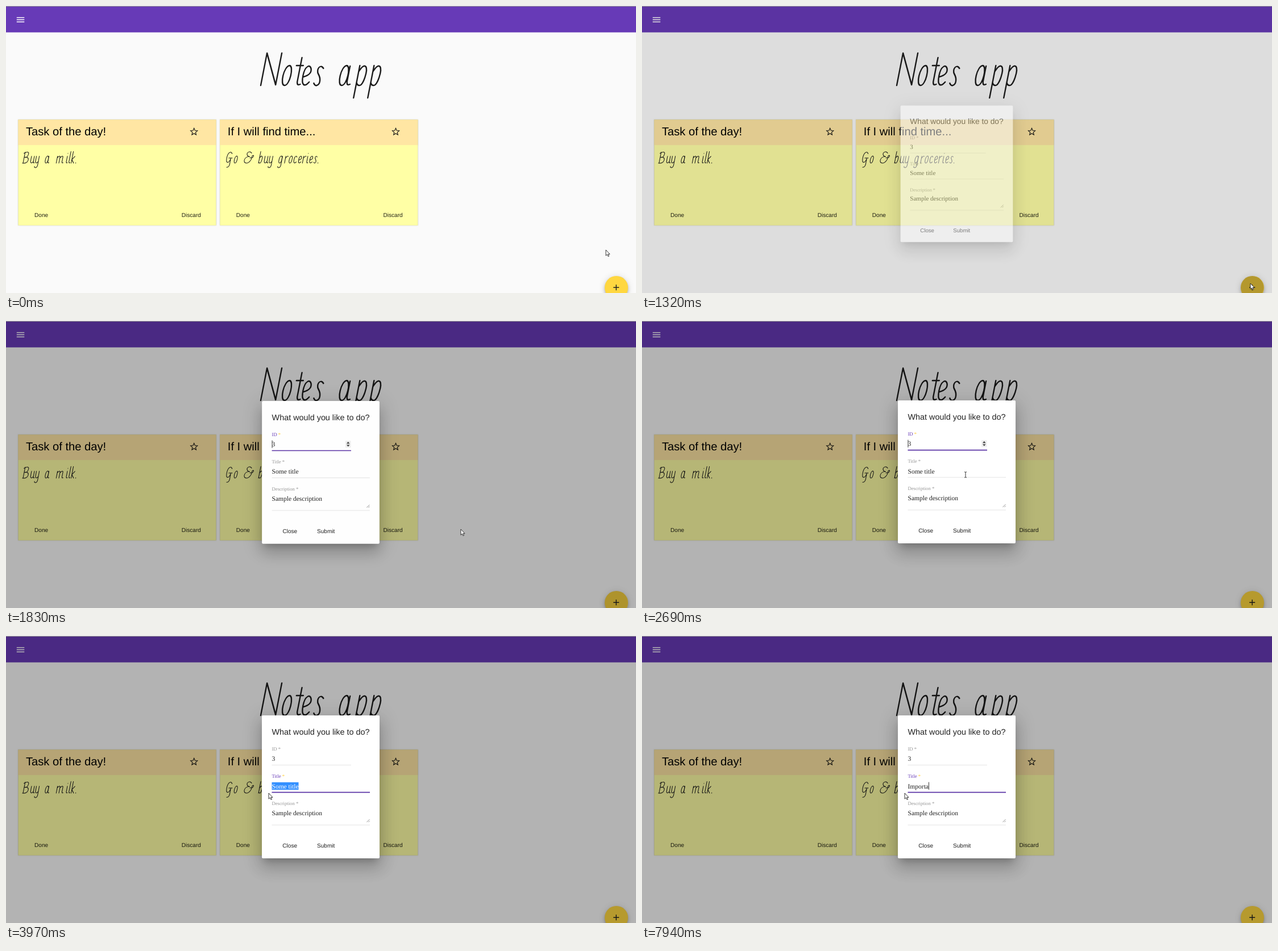
These frames come from a looping animation (1108 px wide and 506 px high, 8000 ms). An HTML page:

```html
<!DOCTYPE html>
<html lang="en">
<head>
<meta charset="utf-8">
<title>Notes app</title>
<style>
  html, body { margin: 0; width: 100%; height: 100%; overflow: hidden; background: #fafafa; }
  #stage { position: relative; width: 1108px; height: 506px; overflow: hidden; background: #fafafa; }
  #stage > * { position: absolute; }
  svg { display: block; overflow: visible; }
  text { font-family: "Liberation Sans", Arial, sans-serif; white-space: pre; fill: rgba(0,0,0,.87);
    text-rendering: geometricPrecision; }
  .serif { font-family: "Liberation Serif", "Times New Roman", serif; }
  .label { fill: rgba(0,0,0,.42); }
  .label.on { fill: #673ab7; }
  .label.on tspan { fill: #ffc928; }
  .hand { fill: none; stroke: #1b1b1b; stroke-linecap: round; stroke-linejoin: round; }
  .card { filter: drop-shadow(0 .9px .6px rgba(0,0,0,.26)) drop-shadow(0 .5px 1px rgba(0,0,0,.14)); }
  #fab { left: 1053px; top: 476px; width: 40.5px; height: 40.5px; border-radius: 50%; background: #ffd740;
    box-shadow: 0 2px 3.6px -.7px rgba(0,0,0,.2), 0 4.3px 7.2px rgba(0,0,0,.14), 0 .7px 13px rgba(0,0,0,.12); }
  #shade { inset: 1px 0 0 0; background: #000; }
  #edge { top: 0; width: 100%; height: 1px; background: #999; }
  #dialog { left: 450px; top: 139.8px; width: 207px; height: 252px; border-radius: 2px; background: #fff;
    box-shadow: 0 8px 11px -5px rgba(0,0,0,.2), 0 17px 27px 2px rgba(0,0,0,.14), 0 6.5px 33px 6px rgba(0,0,0,.12); }
</style>
</head>
<body>
<div id="stage">
  <div id="fab"></div>
  <svg id="scene" width="1108" height="506"></svg>
  <div id="shade"></div>
  <div id="dialog"><svg id="form" width="207" height="252" viewBox="450 139.8 207 252"></svg></div>
  <div id="edge"></div>
  <svg id="pointer" width="1108" height="506">
    <path id="arrow" d="M0 0V10.2L2.4 8L4 11.6L5.6 10.9L4.1 7.5H7Z" fill="#fff" stroke="#222" stroke-width=".9"/>
    <path id="beam" d="M-2 -5Q0 -5 0 -4Q0 -5 2 -5M0 -4V4M-2 5Q0 5 0 4Q0 5 2 5" fill="none" stroke="#333"/>
  </svg>
</div>
<script>
const LOOP = 8000;
const $ = id => document.getElementById(id);

// Stroke lettering: [path, advance], upright, baseline 0, slanted when drawn.
const bowl = 'M8 -35C-2 -34 -3 0 6 0S16 -34 8 -35';
const lobe = 'M0 -24Q6 -38 11 -33C16 -27 13 0 6 0Q2 0 0 -5';
const hook = 'q1 7 6 4';
const loop = 'M14 -34V10q-1 12 -8 12t-6 -6';
const cup = 'M0 -34V-11C1 3 12 2 14 -11';
const curl = 'C9 -38 0 -35 0 -17S7 3 13 -6';
const small = {
  a: [bowl + 'M14 -34V-6' + hook, 31],
  b: ['M0 -57V0' + lobe, 26],
  c: ['M12 -29' + curl, 23],
  e: ['M1 -15Q15 -19 12 -29' + curl, 21.5],
  g: [bowl + loop, 30],
  i: ['M0 -34V-6' + hook + 'M0 -48v1', 13],
  k: ['M0 -57V0M12 -33L0 -17L12 0', 20],
  l: ['M0 -57V-6' + hook, 12],
  m: ['M0 -34V0M0 -25Q8 -39 13 -31V0M13 -25Q22 -39 27 -31V-6' + hook, 48],
  o: [bowl, 23],
  p: ['M0 22V-35' + lobe, 25],
  r: ['M0 -34V0M0 -23Q6 -37 12 -33', 20],
  s: ['M12 -30C5 -39 -1 -28 5 -20S12 -2 6 0Q3 1 0 -4', 19],
  t: ['M4 -49V-6' + hook + 'M-3 -35H9', 12],
  u: [cup + 'M14 -34V-6' + hook, 24],
  y: [cup + loop, 22]
};
const others = {
  N: ['M0 0V-57L26 -1V-57', 36],
  B: ['M0 0V-54M-5 -48Q20 -62 18 -43T0 -29Q24 -31 22 -14T-3 0', 35],
  G: ['M22 -46C14 -62 0 -52 0 -25S14 4 20 -21M10 -25H27M20 -25V8Q18 22 8 20', 39],
  '&': ['M30 -49C18 -62 4 -52 10 -40Q14 -32 24 -32C-4 -34 -6 0 14 0C28 0 36 -18 35 -30C35 -42 46 -39 41 -30Q37 -24 26 -26', 48],
  '.': ['M2 -2v2', 8],
  ' ': ['', 25]
};
const glyphs = { ...small, ...others };

function hand(x, y, scale, width, str) {
  let pen = 0;
  const marks = [...str].map(ch => {
    const [d, advance] = glyphs[ch];
    const mark = `<path d="${d}" transform="translate(${pen})"/>`;
    pen += advance;
    return mark;
  }).join('');
  return `<g class="hand" role="img" aria-label="${str.replace('&', '&amp;')}" stroke-width="${width / scale}"
    transform="translate(${x} ${y}) scale(${scale}) skewX(-11)">${marks}</g>`;
}

const text = (x, y, size, str, attrs = '') =>
  `<text x="${x}" y="${y}" font-size="${size}" ${attrs}>${str}</text>`;
const line = (d, color, width, attrs = '') =>
  `<path d="${d}" stroke="${color}" stroke-width="${width}" fill="none" ${attrs}/>`;
const rect = (x, y, w, h, fill) =>
  `<rect x="${x}" y="${y}" width="${w}" height="${h}" fill="${fill}"/>`;

function star(cx, cy) {
  const points = Array.from({ length: 10 }, (_, i) => {
    const r = i % 2 ? 2.9 : 6.4, a = (i / 5 - .5) * Math.PI;
    return `${cx + r * Math.cos(a)},${cy + r * Math.sin(a)}`;
  }).join(' ');
  return `<polygon points="${points}" fill="none" stroke="#111" stroke-width="1.1"/>`;
}

const card = (x, title, body, bodyX) =>
  `<g class="card">${rect(x, 200.5, 348, 186.3, '#ffffa5')}${rect(x, 200.5, 348, 44.7, '#ffe6a3')}</g>` +
  text(x + 13.5, 227.6, 20.16, title, 'style="fill:#000"') + star(x + 309.2, 221.8) +
  hand(bodyX, 277, .36, 1.05, body) +
  text(x + 28.5, 371.6, 10.08, 'Done') + text(x + 287.2, 371.6, 10.08, 'Discard');

$('scene').innerHTML =
  '<clipPath id="round"><circle cx="1073.25" cy="496.25" r="20.25"/></clipPath>' +
  rect(0, 1, 1108, 45.5, '#673ab7') +
  line('M18.8 20.4H32.3M18.8 24.2H32.3M18.8 28H32.3', '#fff', 1.5) +
  hand(448, 140, 1, 2.4, 'Notes app') +
  card(21.5, 'Task of the day!', 'Buy a milk.', 30) +
  card(376.3, 'If I will find time...', 'Go & buy groceries.', 386.5) +
  '<circle id="ripple" cx="1069" cy="489" clip-path="url(#round)"/>' +
  line('M1068.2 496.2H1078.2M1073.2 491.2V501.2', '#222', 1.45);

const X = 467.5;
const label = (y, str, id = '') =>
  text(X, y, 8.64, `${str} <tspan>*</tspan>`, `class="serif label" id="${id}"`);
const rule = (y, right) => line(`M${X} ${y}H${right}`, '#ddd', .8);
const focusRule = (y, right, id) => line(`M${X} ${y}H${right}`, '#5b34a6', 1.6, `id="${id}"`);

$('form').innerHTML =
  text(X, 174, 14.4, 'What would you like to do?') +
  label(202, 'ID', 'idLabel') + text(X, 220.3, 11.52, '3', 'class="serif"') +
  rule(227.4, 607) + focusRule(227.4, 607, 'idRule') +
  `<g id="spinner">${rect(597, 210, 9.5, 12, '#eee')}
   <path d="M599 215L601.8 211.6L604.6 215ZM599 217L601.8 220.4L604.6 217Z" fill="#444"/></g>` +
  label(250.2, 'Title', 'titleLabel') +
  '<rect id="selection" y="257.7" height="13.2" fill="#3390ff"/>' +
  text(X, 268.4, 11.52, '<tspan id="head"></tspan><tspan id="tail" style="fill:#fff"></tspan>', 'class="serif"') +
  rule(275.4, 640) + focusRule(275.4, 640, 'titleRule') +
  label(298, 'Description') + text(X, 315.6, 11.52, 'Sample description', 'class="serif"') +
  rule(333, 640) + line('M634.5 328L639.5 323M637.5 328L639.5 326', '#777', .8) +
  text(486.3, 373.3, 10.08, 'Close') + text(547, 373.3, 10.08, 'Submit', 'id="submit"') +
  '<rect id="caret" width=".9" height="13.4" fill="#222"/>';

// time, x, y
const path = [
  [270, 1055, 430], [600, 1067, 494], [830, 1070, 489], [1400, 1070, 489], [1540, 1067, 486],
  [1740, 900, 410], [1950, 669, 311], [2200, 590, 285], [2490, 564, 275.5], [2689, 564, 275.5],
  [2690, 569, 271], [3000, 569, 271], [3240, 517, 266], [3330, 517, 266], [3600, 466, 276],
  [3680, 464, 284], [3850, 461, 270], [3910, 461, 274], [3970, 462, 277]
];
const DIALOG = 1320, SETTLED = 1950, FOCUS_ID = 1700, FOCUS_TITLE = 3240, DRAG = 3330, CLEARED = 4780;
const keys = [6260, 6670, 7010, 7240, 7500, 7740, 7940];
const oldTitle = 'Some title', newTitle = 'Importa';

const within = (t, a, b) => t >= a && t < b;
const show = (id, on) => $(id).style.visibility = on ? 'visible' : 'hidden';

function pointerAt(t) {
  const next = path.findIndex(p => p[0] > t);
  if (next < 0) return path[path.length - 1].slice(1);
  if (next === 0) return path[0].slice(1);
  const [t0, x0, y0] = path[next - 1], [t1, x1, y1] = path[next];
  const k = (t - t0) / (t1 - t0);
  return [x0 + (x1 - x0) * k, y0 + (y1 - y0) * k];
}

function drawPointer(t, [x, y]) {
  const isBeam = within(t, 2690, 3910);
  show('beam', isBeam);
  show('arrow', !isBeam);
  $(isBeam ? 'beam' : 'arrow').setAttribute('transform', `translate(${x} ${y})`);
}

function drawRipple(t) {
  const grow = Math.max(0, (t - 1150) / 110);
  $('ripple').setAttribute('r', Math.min(45, 17 * grow ** 1.5));
  $('ripple').setAttribute('opacity', .2 * Math.max(0, Math.min(1, (1900 - t) / 300)));
}

function drawDialog(t) {
  const open = t >= DIALOG;
  const step = Math.max(0, Math.floor((t - 1330) / 70));
  const rest = rate => t < SETTLED ? Math.exp(-rate * step) : 0;
  show('shade', open);
  $('shade').style.opacity = .288 * (1 - .59 * rest(.57));
  $('dialog').style.display = open ? 'block' : 'none';
  $('dialog').style.opacity = 1 - .5 * rest(.655);
  $('dialog').style.transform = `translateY(${29.9 * rest(.5)}px) scale(${1 - .045 * rest(.5)})`;
}

function drawForm(t, pointerX) {
  const onId = within(t, FOCUS_ID, FOCUS_TITLE), onTitle = t >= FOCUS_TITLE;
  for (const [name, on] of [['id', onId], ['title', onTitle]]) {
    $(name + 'Label').classList.toggle('on', on);
    $(name + 'Rule').style.display = on ? '' : 'none';
  }
  $('spinner').style.display = onId ? '' : 'none';

  const typed = keys.filter(k => t >= k).length;
  const cleared = t >= CLEARED;
  const value = cleared ? newTitle.slice(0, typed) : oldTitle;
  const dragging = within(t, DRAG, CLEARED);
  const reach = Math.max(0, Math.min(1, (pointerX - X) / 47.5));
  const cut = !dragging ? value.length : t > 3600 ? 0 : Math.round(reach * value.length);
  $('head').textContent = value.slice(0, cut);
  $('tail').textContent = value.slice(cut);
  const headEnd = X + (cut ? $('head').getComputedTextLength() : 0);
  $('selection').setAttribute('x', headEnd);
  $('selection').setAttribute('width', cut < value.length ? $('tail').getComputedTextLength() : 0);
  $('submit').style.fill = cleared && !typed ? 'rgba(0,0,0,.26)' : '';

  const caretOn = onId ? !within(t, 2200, 2690) : cleared && !within(t, 5280, 5870);
  $('caret').style.display = caretOn ? '' : 'none';
  $('caret').setAttribute('x', onId ? X : headEnd);
  $('caret').setAttribute('y', onId ? 209.3 : 257.4);
}

function render(t) {
  const pointer = pointerAt(t);
  drawPointer(t, pointer);
  drawRipple(t);
  drawDialog(t);
  if (t >= DIALOG) drawForm(t, pointer[0]);
}

const start = performance.now();
function tick() {
  render((performance.now() - start) % LOOP);
  requestAnimationFrame(tick);
}
tick();
</script>
</body>
</html>
```
